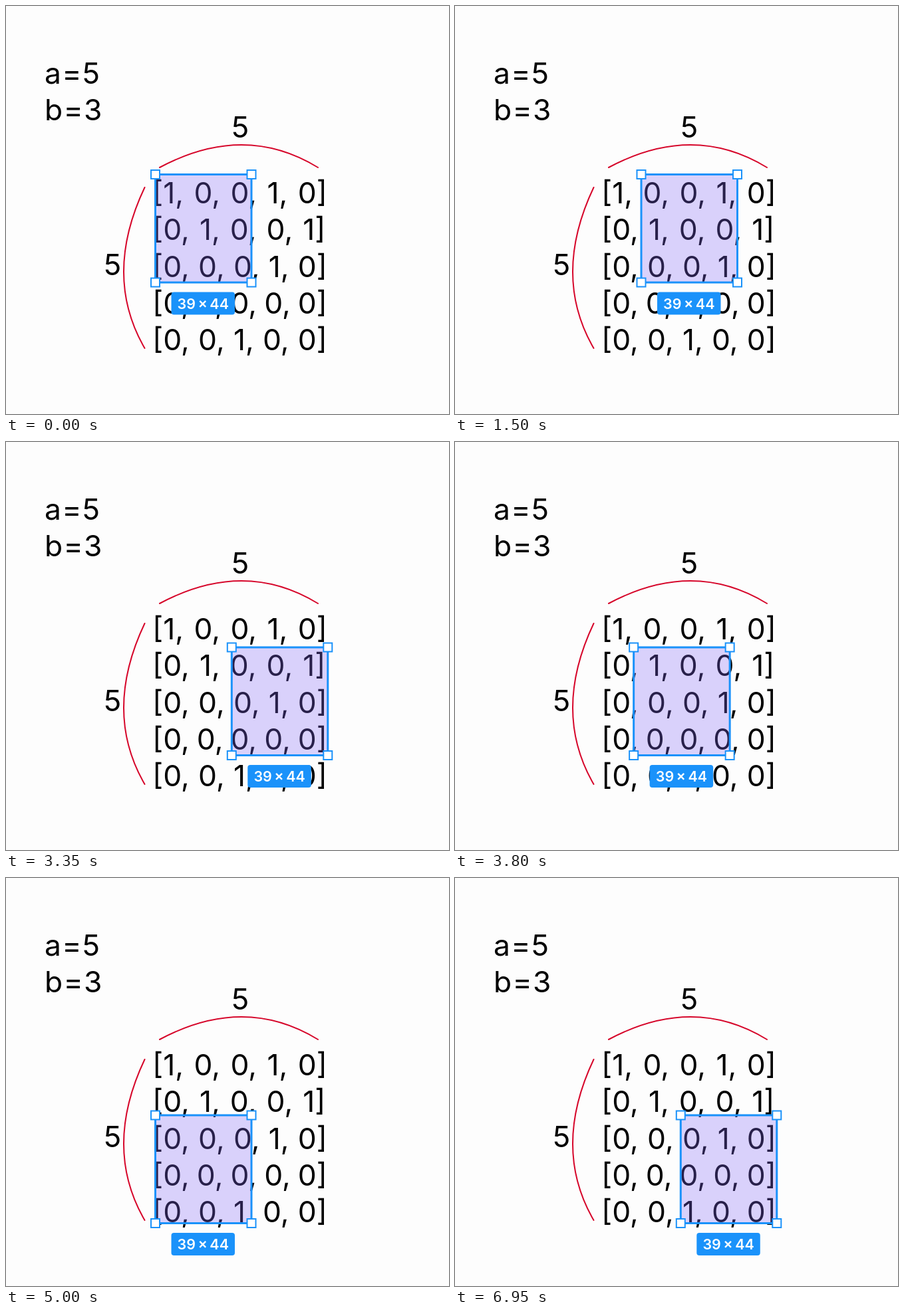
Write an HTML page that moves like this. It is 666 by 614 pixels and loops after 8.15 s.

```html
<!DOCTYPE html>
<html lang="en">
<head>
<meta charset="utf-8">
<style>
html, body { margin: 0; width: 100%; height: 100%; overflow: hidden; background: #fdfdfd; }
body { font: 44.35px/55.4px Inter, sans-serif; font-optical-sizing: none; color: #000; }
div { position: absolute; white-space: pre; }
#grid { left: 220px; top: 253.7px; width: 263px; }
#grid p { margin: 0; display: flex; justify-content: space-between; }
#grid p:nth-child(2) { width: 260.5px; }
svg { position: absolute; left: 0; top: 0; }
.arc { fill: none; stroke: #d6062a; stroke-width: 2; stroke-linecap: round; }
#area { fill: rgba(133, 107, 243, .3); stroke: #1a92fa; stroke-width: 3; }
.grip { fill: #fff; stroke: #1a92fa; stroke-width: 2; }
#size { fill: #1a92fa; }
#box text { fill: #fff; font: 600 21.5px Inter, sans-serif; word-spacing: -2px; text-anchor: middle; }
</style>
</head>
<body>
<div style="left:58px;top:73.7px;letter-spacing:1.3px">a=5
b=3</div>
<div style="left:339px;top:154.5px">5</div>
<div style="left:147px;top:362px">5</div>
<div id="grid"></div>
<svg width="666" height="614">
  <path class="arc" d="M231 243Q358 175 469 243M208.5 273Q145.5 406 208.5 515"/>
  <g id="box">
    <rect id="area" width="144.5" height="162.5"/>
    <rect id="size" x="24" y="177" width="95.5" height="34" rx="4"/>
    <text x="71.8" y="202">39 × 44</text>
  </g>
</svg>
<script>
const rows = ['10010', '01001', '00010', '00000', '00100'];
grid.innerHTML = rows.map(row =>
  `<p>${`[${[...row].join(', ')}]`.split(' ').map(s => `<span>${s}</span>`).join('')}</p>`).join('');

const svgBox = document.getElementById('box');
for (const x of [0, 144.5]) for (const y of [0, 162.5]) {
  const grip = document.createElementNS(svgBox.namespaceURI, 'rect');
  const attrs = { class: 'grip', x: x - 6.5, y: y - 6.5, width: 13, height: 13 };
  for (const k in attrs) grip.setAttribute(k, attrs[k]);
  svgBox.append(grip);
}

const LOOP = 8150, STEP = 50;
const X = [224.5, 280, 339.3], Y = [253.5, 309, 357];
// Time, column and row of the selection; it moves evenly between them.
const keys = [
  [0, 0, 0], [800, 0, 0], [1300, 1, 0], [1800, 1, 0], [2350, 2, 0],
  [2700, 2, 0], [3200, 2, 1], [3400, 2, 1], [4050, 0, 1],
  [4550, 0, 1], [4950, 0, 2], [5250, 0, 2], [6450, 2, 2], [LOOP, 2, 2]
];

function frame(now) {
  const t = Math.floor(now % LOOP / STEP) * STEP;
  const i = keys.findIndex(k => k[0] > t);
  const [t0, c0, r0] = keys[i - 1], [t1, c1, r1] = keys[i];
  const mix = (a, b) => a + (b - a) * (t - t0) / (t1 - t0);
  svgBox.setAttribute('transform', `translate(${mix(X[c0], X[c1])} ${mix(Y[r0], Y[r1])})`);
  requestAnimationFrame(frame);
}
requestAnimationFrame(frame);
</script>
</body>
</html>
```
